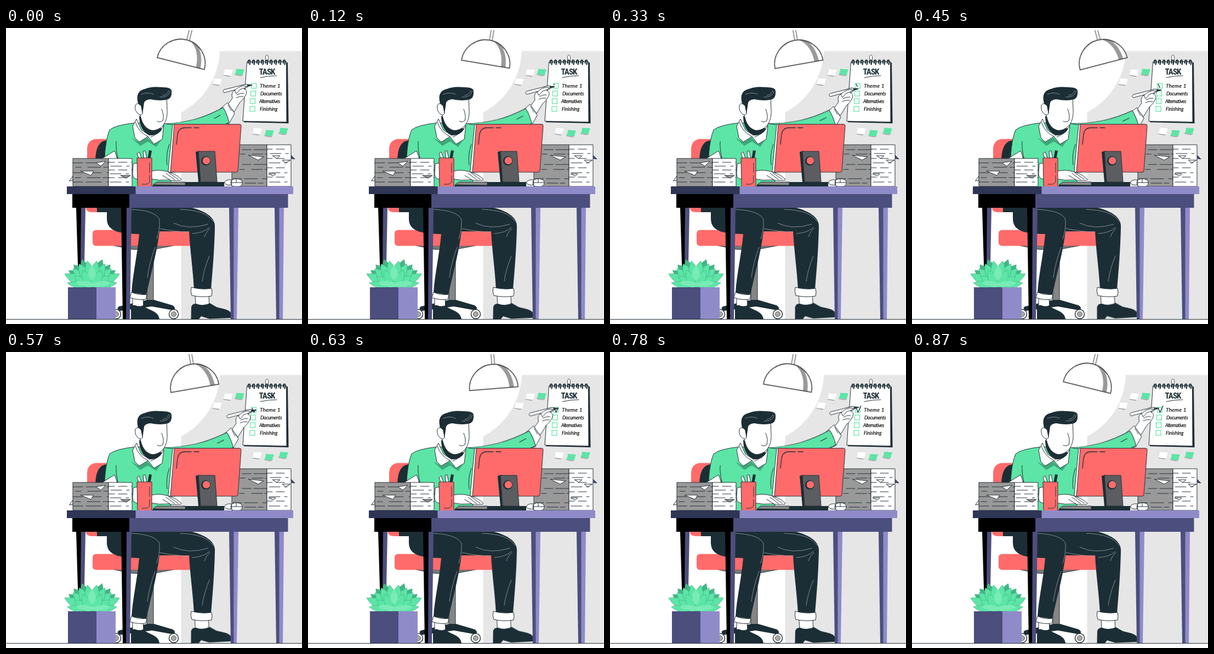
Write an HTML page that moves like this. It is 540x540 px and loops after 900 ms.

```html
<!DOCTYPE html>
<html lang="en">
<head>
<meta charset="utf-8">
<title>Task list</title>
<style>
html, body { margin: 0; width: 100%; height: 100%; overflow: hidden; background: #fff; }
svg { display: block; width: 100vw; height: 100vh; }
.ink { fill: #1c2e35; }
.green { fill: #5ce5a6; }
.red { fill: #ff6b6b; }
.white { fill: #fff; }
.navy { fill: #4c4e7d; }
.lilac { fill: #8f8bc9; }
.grey { fill: #999; }
.out { stroke: #263238; stroke-width: 1; stroke-linejoin: round; }
.line { fill: none; stroke: #263238; stroke-width: 1; stroke-linecap: round; stroke-linejoin: round; }
.fold { fill: none; stroke: #8d979b; stroke-width: .9; stroke-linecap: round; }
.title { font: 700 15px "Roboto Condensed", "Liberation Sans Narrow", Roboto, sans-serif; font-stretch: 75%; letter-spacing: -.9px; text-anchor: middle; }
.note { font: italic 400 9px Lato, "Open Sans", sans-serif; fill: #111; stroke: #111; stroke-width: .2; }
.box { fill: #fff; stroke: #5ce5a6; stroke-width: 1.2; }

.lamp { transform-origin: 335px 5px; animation: swing 450ms cubic-bezier(.37, 0, .63, 1) infinite alternate; }
.hand { animation: write 900ms linear infinite; }
.sleeve { transform-origin: 300px 172px; animation: reach 900ms linear infinite; }
.tick { stroke-dasharray: 20 40; animation: tick 900ms linear infinite; }
.foot { transform-origin: 342px 531px; animation: tap 450ms ease-in-out infinite alternate; }

@keyframes swing { from { transform: rotate(14.2deg); } to { transform: rotate(-14.6deg); } }
@keyframes write {
  0%, 100% { transform: translate(0, 0); }
  23% { transform: translate(2px, 5px); }
  37% { transform: translate(4px, 7px); }
  50% { transform: translate(6px, 9px); }
  63% { transform: translate(7px, 2.5px); }
  77% { transform: translate(8px, -5px); }
  97% { transform: translate(1.5px, -1.5px); }
}
@keyframes reach {
  0%, 100% { transform: matrix(1, 0, 0, 1, 0, 0); }
  23% { transform: matrix(1.02, .03, 0, 1, 0, 0); }
  37% { transform: matrix(1.04, .05, 0, 1, 0, 0); }
  50% { transform: matrix(1.06, .06, 0, 1, 0, 0); }
  63% { transform: matrix(1.07, .02, 0, 1, 0, 0); }
  77% { transform: matrix(1.08, -.04, 0, 1, 0, 0); }
  97% { transform: matrix(1.015, -.012, 0, 1, 0, 0); }
}
@keyframes tick {
  0% { stroke-dashoffset: 20; }
  50% { stroke-dashoffset: 13; }
  77%, 100% { stroke-dashoffset: 0; }
}
@keyframes tap { from { transform: rotate(0); } to { transform: rotate(-1.2deg); } }
</style>
</head>
<body>
<svg viewBox="0 0 540 540">
  <defs>
    <path id="leaf" d="M0 0C-12-10-10-24 0-34C10-24 12-10 0 0Z"/>
    <path id="ring" d="M-2 1Q-3-4.500 0-4.500Q2.500-4 .5 3.500" fill="none" stroke="#1c2e35" stroke-width="2.200" stroke-linecap="round"/>
    <g id="sticky"><path d="M2 0L17 1Q14 7 14 12L-1 10Q2 6 2 0Z"/><path d="M-1 10L14 12L10 13.500L0 11.500Z" fill="#aaa"/></g>
    <clipPath id="dome"><path d="M289.500 67A44.500 44.500 0 0 1 378.500 67Z"/></clipPath>
    <clipPath id="room"><rect y="4" width="540" height="536"/></clipPath>
  </defs>

  <!-- wall and floor -->
  <path d="M390 42H539.500V531H319.500V154A132 132 0 0 0 390 42Z" fill="#e6e6e6"/>
  <path d="M0 531.500H540" stroke="#263238"/>

  <!-- sticky notes -->
  <use href="#sticky" x="397" y="75.500" class="white"/>
  <use href="#sticky" x="377" y="92" class="white"/>
  <use href="#sticky" x="450" y="182.500" class="white"/>
  <use href="#sticky" x="418" y="74.500" class="green"/>
  <use href="#sticky" x="472" y="186" class="green"/>
  <use href="#sticky" x="498" y="182" class="green"/>

  <!-- notepad -->
  <path class="ink" d="M441 63L514 63L515.500 174L434 172Z"/>
  <path class="white out" d="M439.500 62L511.500 61.500L512 171.500L432 170Z"/>
  <path d="M473.500 62V52Q476 46 478.500 52V62Z" fill="#fff" stroke="#555"/>
  <use href="#ring" x="444" y="63"/><use href="#ring" x="452" y="63"/><use href="#ring" x="460" y="63"/>
  <use href="#ring" x="468" y="63"/><use href="#ring" x="476" y="63"/><use href="#ring" x="484" y="63"/>
  <use href="#ring" x="492" y="63"/><use href="#ring" x="500" y="63"/><use href="#ring" x="508" y="63"/>
  <text class="title ink" x="476" y="84.500">TASK</text>
  <path class="line" d="M464 90.500Q478 87 494 87"/>
  <rect class="box" x="447.500" y="101" width="9" height="9"/>
  <rect class="box" x="446.500" y="115" width="9" height="9"/>
  <rect class="box" x="445.500" y="129" width="9" height="9"/>
  <rect class="box" x="445" y="143" width="9" height="9"/>
  <g class="note">
    <text x="463" y="109" style="font-size:10px;letter-spacing:.2px">Theme 1</text>
    <text x="464" y="122.500" style="letter-spacing:-.4px">Documents</text>
    <text x="462" y="137" style="letter-spacing:-.6px">Alternatives</text>
    <text x="463" y="151" style="letter-spacing:-.1px">Finishing</text>
  </g>
  <path class="line tick" pathLength="20" d="M449 102L452.500 110L458 98" style="stroke-width:1.4;stroke-linecap:butt"/>

  <!-- lamp -->
  <g clip-path="url(#room)"><g class="lamp">
    <path d="M334 -4V24M339 -4V24" stroke="#555" fill="none" stroke-width="1.200"/>
    <path d="M289.500 67A44.500 44.500 0 0 1 378.500 67Z" fill="#fff"/>
    <path clip-path="url(#dome)" d="M335 21C351 25 363 44 362.500 68H371C370 42 359 25 341 21Z" fill="#999"/>
    <path d="M289.500 67A44.500 44.500 0 0 1 378.500 67Z" fill="none" stroke="#333" stroke-width="1.300"/>
  </g></g>

  <!-- chair -->
  <path class="red" d="M148 240V220Q149 204 164 202.500H184V336H158Q146 336 146 328Z"/>
  <path class="ink" d="M163 240Q164 206 184 205H196V336H166Z"/>
  <path d="M197 397H306L268 404H232Z" fill="#777" class="out"/>
  <path d="M257 400H269V498H257Z" fill="#858585" class="out"/>
  <path class="ink" d="M258 496H270L304 506Q312 511 305 515L266 508L208 516Q200 512 206 508Z"/>
  <g fill="#fff" stroke="#263238" stroke-width="1.500"><circle cx="201" cy="522" r="8.500"/><circle cx="306" cy="522" r="8.500"/></g>
  <g fill="#aaa" stroke="#555"><circle cx="201" cy="522" r="4.500"/><circle cx="306" cy="522" r="4.500"/></g>
  <rect class="red" x="158" y="368.500" width="184" height="29" rx="6"/>

  <!-- legs -->
  <path class="ink" d="M262 326H330C362 332 383 345 381 364C380 408 377 440 374 477H343C341 440 336 408 334 371H270Z"/>
  <g class="foot">
    <path class="white out" d="M345 486H370L371 508H346Z"/>
    <path class="ink" d="M337.500 531L338 509Q340 502 347 503Q360 508 372 502L384 509C398 513 410 514 411 522L410 529L371 530.500L356 526L352 531Z"/>
  </g>
  <path class="white out" d="M338 473Q358 478 375 475Q377 482 375 489Q357 492 339 488Q336 480 338 473Z"/>
  <path class="ink" d="M184 326H264C278 334 282 346 281 360C278 400 266 440 256 487L229 483C231 450 240 412 243 376C214 375 184 374 184 348Z"/>
  <path class="white out" d="M231 490H250L251 512H231Z"/>
  <path class="white out" d="M229 482Q242 488 257 486L255 495Q241 497 226 492Z"/>
  <path class="ink" d="M228 531V512Q230 504 236 506Q244 509 250 506C258 515 278 515 280 531Z"/>
  <path class="fold" d="M216 331C254 330 276 338 280 350Q281 368 275 385M272 400Q261 430 258 455M281 366Q310 372 334 372M318 331Q365 332 378 353M306 356Q333 369 368 358M340 375Q360 374 371 364M362 381Q366 370 372 366M371 416Q361 440 358 462"/>

  <!-- reaching arm -->
  <g class="hand">
    <path class="white out" d="M405 139L413 128Q410 119 416 114L428 105Q437 101 441 105Q443 108 434 111Q441 113 438 121Q434 130 427 135L416 153Z"/>
    <path class="white out" d="M390 148L404 136L417 156L407 174L396 178Z"/>
    <path class="white out" d="M397.500 112.500L437 102.500L449 104L439 107L398 118Q394 116 397.500 112.500Z"/>
    <path class="ink" d="M440 103L450 104.500L440 107Z"/>
    <path class="white out" d="M417 114Q428 103 439 106Q438 109 427 112L420 120Z"/>
    <path class="line" d="M421 122Q428 118 434 119M420 127Q426 124 433 125M405 140L411 151"/>
  </g>
  <g class="sleeve">
    <path class="green out" d="M286 175C330 173 362 164 396 145Q403 156 407 172C398 178 370 188 350 195H286Z"/>
    <path class="line" d="M380 165L391 159"/>
  </g>

  <!-- torso -->
  <path class="green out" d="M236 173Q199 177 189 186Q182 202 180 234Q192 238 204 236L206 292H300L308 177L286 174Z"/>
  <path class="white out" d="M174 239L198 224Q201 231 203 239Z"/>
  <path class="line" d="M204 237Q200 220 201 207M298 212Q291 232 294 250"/>
  <path d="M228 200L243 208L258 200L270 212L284 203L274 217L259 207L245 215Z" fill="#3fa87a"/>
  <path class="white out" d="M238 166L231 179L235 200L243 208L259 198L270 212L285 203L288 177L278 178L262 196L247 186Z"/>
  <path class="line" d="M236 172Q242 190 259 198M287 179Q281 192 264 199"/>
  <path class="ink" d="M243 160C243 178 250 192 265 196Q279 195 285 184L260 172Z"/>

  <!-- head -->
  <path class="white out" d="M246 125L245 158C248 177 257 185 267 187C285 186 295 171 294 150L293 124Z"/>
  <path class="white out" d="M248 142Q240 134 236 141Q234 152 243 158Q247 160 249 156Z"/>
  <path class="line" d="M284 148Q289 160 286 169Q281 173 276 170"/>
  <path class="ink" d="M241 138C237 122 241 114 254 111Q265 106 284 108Q302 108 302 115Q303 127 296 130Q283 134 263 130Q254 131 252 136L249 157L246 142Z"/>
  <path class="fold" d="M247 121Q258 116 269 121M281 126Q296 127 300 115M286 123Q294 122 297 114"/>

  <!-- right paper stack -->
  <path class="out" d="M519 231L527 239L519 238Z" fill="#4c4e7d"/>
  <path class="grey out" d="M412 213H476V289H412Z"/>
  <path class="white out" d="M476 213H520V289H476Z"/>
  <path class="line" d="M431 222H476M431 249H476M414 275H476" stroke-dasharray="16 5 24 9"/>
  <path class="line" d="M427 230H476M426 258H476M414 283H476" stroke-dasharray="9 13 20 4"/>
  <path class="line" d="M476 221H520M476 238H520M476 255H520M476 272H520" stroke-dasharray="10 7 15 12"/>
  <path class="line" d="M482 229H520M480 246H520M480 264H520M480 281H520" stroke-dasharray="20 8 5 10"/>
  <path class="white out" d="M442 232L470 235L460 241ZM486 233L500 233L494 238Z"/>
  <path class="white out" d="M504 241H519L510 246ZM479 266H492L488 270Z"/>

  <!-- left paper stack -->
  <path class="white out" d="M115.500 279L122 270V278Z"/>
  <path class="grey out" d="M122 238H187V289H122Z"/>
  <path class="white out" d="M187 238H230V289H187Z"/>
  <path class="line" d="M122 246H187M122 264H187M122 281H187" stroke-dasharray="18 6 28 10"/>
  <path class="line" d="M127 254H187M126 273H187" stroke-dasharray="10 12 24 5"/>
  <path class="line" d="M187 245H230M187 259H230M187 273H230" stroke-dasharray="11 7 16 8"/>
  <path class="line" d="M191 252H230M190 266H230M190 281H230" stroke-dasharray="20 9 5 6"/>
  <path class="white out" d="M136 261L160 261L155 269ZM164 246L182 243L173 252Z"/>
  <path class="grey out" d="M209 269H227L219 274Z"/>

  <!-- monitor, keyboard and mouse -->
  <path class="white out" d="M232 248Q239 245 242 248V276Q231 276 231 266Z"/>
  <path class="white out" d="M262 262Q278 257 294 262Q309 266 319 275Q321 279 315 278Q308 279 296 277Q280 279 262 275Z"/>
  <path class="line" d="M292 265L308 277M297 264L314 276M286 269L299 277"/>
  <path class="white out" d="M304 176H317L309 263H298Q295 263 296 260Z"/>
  <path class="red out" d="M307 175.500H426Q429.500 175.500 429 179L423 260Q423 263 420 263H300Z"/>
  <path class="line" d="M311 212L313 194Q315 182 326 182H338M343 182H352" style="stroke-width:1.300"/>
  <path class="ink" d="M267 288L276 281H398V289H267Z"/>
  <path d="M268 286L275 281H327V287Z" fill="#888" class="out"/>
  <path class="ink" d="M346 226L353 224L359 281H351Z"/>
  <path d="M351 225H381L385 281H355Z" fill="#5b5d60" class="out"/>
  <circle class="ink" cx="364.500" cy="242.500" r="8.500"/>
  <circle class="red" cx="365.500" cy="242" r="6.800"/>
  <path class="white out" d="M398 282Q401 276 411 277L412 286Q402 288 398 282ZM410 282Q411 275 421 275Q431 276 431 282Q431 288 426 289H415Q410 288 410 282Z"/>
  <path class="line" d="M411 282H431M420 275V282"/>

  <!-- pencil cup -->
  <path class="white out" d="M239 229L243 226L248 240H243ZM250 225L254 224L257 240H252Z"/>
  <path class="ink" d="M261 223L266 224L263 240H258Z"/>
  <path class="red out" d="M239 237H266V290H240Z"/>
  <path class="line" d="M262 246V264M262 269V280Q261 285 254 285H248"/>

  <!-- desk -->
  <path fill="#000" d="M128 328H137L136.500 531H134ZM210 328H220V531H213Z"/>
  <path class="navy" d="M137 328H145L141 531H136ZM220 328H229L226 531H219ZM407 328H416V531H410ZM490 328H499V531H493Z"/>
  <path class="lilac" d="M415.500 328H424L421 531H415.500ZM498.500 328H507L505 531H498.500Z"/>
  <path d="M121 302H226V328H121Z" fill="#000"/>
  <path class="navy" d="M225 302H514.500V328H225Z"/>
  <path d="M111 289H237V303H111Z" fill="#2f3554"/>
  <path class="lilac" d="M236.500 289H524V303H236.500Z"/>

  <!-- plant -->
  <g transform="translate(157 473)">
    <g fill="#43b586">
      <use href="#leaf" transform="rotate(-39) scale(1.2 1.570)"/><use href="#leaf" transform="rotate(39) scale(1.2 1.570)"/>
      <use href="#leaf" transform="rotate(-20) scale(1.2 1.600)"/><use href="#leaf" transform="rotate(20) scale(1.2 1.600)"/>
      <use href="#leaf" transform="rotate(-54) scale(1.1 1.560)"/><use href="#leaf" transform="rotate(54) scale(1.1 1.560)"/>
    </g>
    <g fill="#5ce5a6" stroke="#43b586" stroke-width=".6">
      <use href="#leaf" transform="rotate(-64) scale(1.1 1.630)"/><use href="#leaf" transform="rotate(64) scale(1.1 1.630)"/>
      <use href="#leaf" transform="rotate(-46) scale(1.1 1.430)"/><use href="#leaf" transform="rotate(46) scale(1.1 1.430)"/>
      <use href="#leaf" transform="rotate(-29) scale(1.1 1.430)"/><use href="#leaf" transform="rotate(29) scale(1.1 1.430)"/>
      <use href="#leaf" transform="rotate(-10) scale(1.05 1.430)"/><use href="#leaf" transform="rotate(10) scale(1.05 1.430)"/>
      <use href="#leaf" transform="rotate(-80) scale(.8 1.350)"/><use href="#leaf" transform="rotate(80) scale(.8 1.350)"/>
      <use href="#leaf" transform="rotate(-58) scale(.9 1.100)"/><use href="#leaf" transform="rotate(58) scale(.9 1.100)"/>
      <use href="#leaf" transform="rotate(-30) scale(1 1.050)"/><use href="#leaf" transform="rotate(30) scale(1 1.050)"/>
    </g>
    <g fill="#78ebb6">
      <use href="#leaf" transform="translate(0 -12) scale(.850 .800)"/>
      <ellipse cx="-12" cy="-4.500" rx="17" ry="5" transform="rotate(8)"/><ellipse cx="16" cy="-4.500" rx="17" ry="5" transform="rotate(-6)"/>
    </g>
  </g>
  <path class="navy" d="M113 473H166V531H113Z"/>
  <path class="lilac" d="M165 473H200V531H165Z"/>
</svg>
</body>
</html>
```
